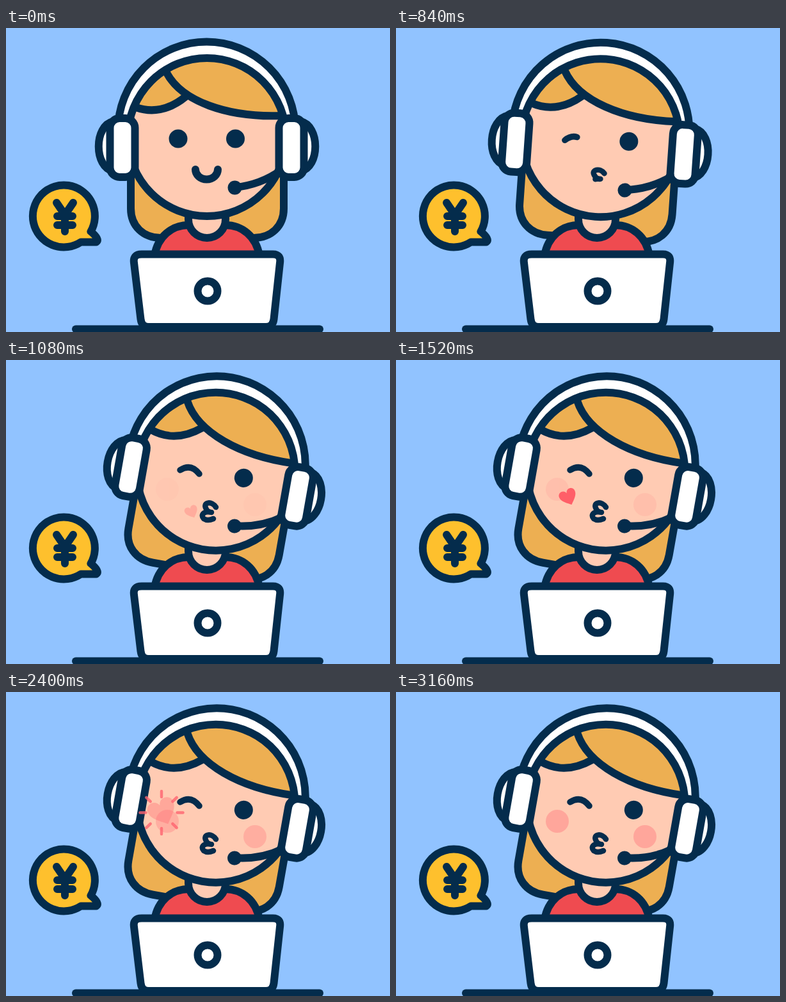
These frames come from a looping animation (600x475 px, 3320 ms). An HTML page:

```html
<!DOCTYPE html>
<html lang="en">
<head>
<meta charset="utf-8">
<title>Support agent</title>
<style>
  html, body { margin: 0; width: 100%; height: 100%; overflow: hidden; background: #91c3ff; }
  svg { display: block; width: 100%; height: 100%; }
  .line { fill: none; stroke: #042c4c; stroke-width: 12; stroke-linecap: round; stroke-linejoin: round; }
  .dark { fill: #042c4c; }
  .white { fill: #fff; }
  .skin { fill: #ffcbb3; }
  .hair { fill: #edaf52; }
  .pink { fill: #ffa69b; }
</style>
</head>
<body>
<svg viewBox="0 0 600 475">
  <defs>
    <clipPath id="skull"><circle cx="314" cy="170.5" r="123.5"/></clipPath>
    <g id="phone" class="line white">
      <path d="M168 146C137 152 137 218 168 224"/>
      <rect x="162.5" y="141" width="39" height="92" rx="15"/>
    </g>
  </defs>

  <g class="line">
    <path fill="#fec02d" d="M132.5 318A48.5 48.5 0 1 0 117 334.5L141 334.5Q147 330 132.5 318Z"/>
    <path d="M79 273L92 292L105 273M92 292V318M80 294H104M80 308H104"/>
  </g>

  <g class="turn line">
    <path class="hair" d="M195 180V282C195 310 215 328 242 328H387C414 328 434 310 434 282V180Z"/>
  </g>

  <g class="line">
    <path fill="#ef4b50" d="M232 356C237 325 260 308 285 308H343C368 308 391 325 396 356Z"/>
    <path class="skin" d="M285 280V299a29 29 0 0 0 58 0V280"/>
  </g>

  <g class="turn">
    <path class="line white" d="M175 160A138.5 138.5 0 0 1 452 160"/>
    <g clip-path="url(#skull)">
      <path class="skin" d="M180 40H450V300H180Z"/>
      <path class="hair" d="M185 120L203 124Q243 138 281 107C320 130 370 137 445 137V30H185Z"/>
      <path class="line" d="M195 122L203 124Q243 138 281 107M251 70C275 115 346 140 430 137"/>
    </g>
    <circle class="line" cx="314" cy="170.5" r="123.5"/>
    <g class="dark">
      <circle id="eye" cx="269" cy="173" r="14.5"/>
      <circle cx="358.5" cy="173" r="14.5"/>
      <circle cx="357.5" cy="249.5" r="11"/>
    </g>
    <path id="smile" class="line" d="M296 221a17.5 15.5 0 0 0 35 0"/>
    <path class="line" d="M358 249Q398 245 430 222"/>
    <use href="#phone"/>
    <use href="#phone" transform="translate(628) scale(-1 1)"/>

    <!-- drawn in the coordinates of the fully tilted head -->
    <g transform="rotate(-10 300 252)">
      <g id="cheeks" class="pink">
        <circle cx="252" cy="202" r="18"/>
        <circle cx="389" cy="226" r="18"/>
      </g>
      <g id="kiss" class="line">
        <path pathLength="1" style="stroke-width:9.5" d="M272 172Q289 161 302 178"/>
        <path pathLength="1" style="stroke-width:8.5"
          d="M328 230C322 220 308 222 312 231C314 237 318 238 321 238C310 235 303 242 309 248Q315 252 324 248"/>
      </g>
      <path id="heart" fill="#ff5f68"
        d="M0 17C-6 11 -17 4 -17 -6C-17 -16 -3 -18 0 -8C3 -18 17 -16 17 -6C17 4 6 11 0 17Z"/>
      <g id="rays" stroke="#ff6470" stroke-width="4.5" stroke-linecap="round"></g>
    </g>
  </g>

  <g class="line">
    <path class="white" d="M212 353.5H417Q430 353.5 428 367L418.5 455Q417 467 406 467H223Q212 467 210.5 455L200 367Q198 353.5 212 353.5Z"/>
    <circle cx="315" cy="411" r="15.5"/>
    <path d="M109 470.5H490"/>
  </g>
</svg>
<script>
const LOOP = 3320, TICK = 40;
const $ = id => document.getElementById(id);
const turning = document.querySelectorAll('.turn');
const ramp = (t, from, to) => Math.min(1, Math.max(0, (t - from) / (to - from)));
const mix = (a, b, p) => a + (b - a) * p;
const show = (id, alpha) => $(id).setAttribute('opacity', alpha);

for (let a = 0; a < 360; a += 45)
  $('rays').innerHTML += `<path d="M24.5 0H33.5" transform="translate(243 188.5) rotate(${a})"/>`;

function draw(t) {
  const tilt = 10 * ramp(t, 680, 1080);
  turning.forEach(g => g.setAttribute('transform', `rotate(${tilt} 300 252)`));

  // smile and open eye give way to the wink and kiss
  show('eye', t < 720 ? 1 : 0);
  show('smile', t < 720 ? 1 : 0);
  const drawn = ramp(t, 720, 920);
  show('kiss', drawn > 0 ? 1 : 0);
  for (const p of $('kiss').children) p.setAttribute('stroke-dasharray', drawn < 1 ? `${drawn} 2` : 'none');

  show('cheeks', ramp(t, 880, 2880));

  // heart floats to the cheek, swells and fades
  const fly = ramp(t, 1080, 2040);
  const size = mix(0.6, 1, fly) + 0.3 * ramp(t, 2040, 2440);
  $('heart').setAttribute('transform',
    `translate(${mix(290, 244.5, fly)} ${mix(237, 186.5, fly)}) rotate(-24) scale(${size})`);
  show('heart', ramp(t, 920, 1480) * (1 - ramp(t, 2080, 2560)));
  show('rays', ramp(t, 2000, 2500) * (1 - ramp(t, 2840, 3160)));
}

const start = performance.now();
function frame() {
  const t = (performance.now() - start) % LOOP;
  draw(Math.floor(t / TICK) * TICK);
  requestAnimationFrame(frame);
}
frame();
</script>
</body>
</html>
```
